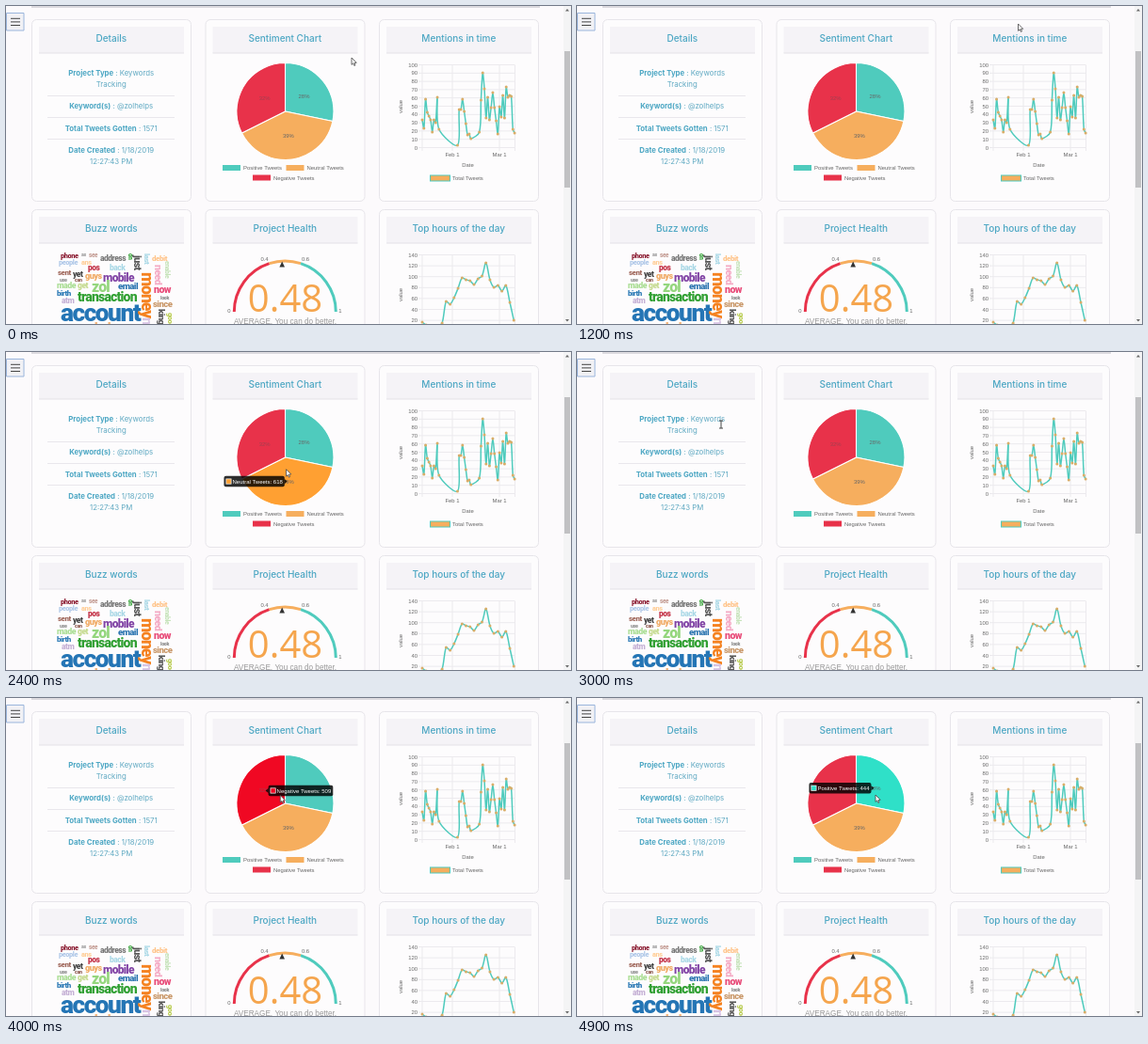
An HTML page with a canvas that plays this animation: 600x338 px, repeating every 5000 ms.

```html
<!DOCTYPE html>
<html lang="en">
<head>
<meta charset="utf-8">
<title>Dashboard</title>
<style>
html, body { margin: 0; width: 100%; height: 100%; overflow: hidden; background: #fcfafc; }
canvas { display: block; }
</style>
</head>
<body>
<canvas id="stage" width="600" height="338"></canvas>
<script>
const c = document.getElementById('stage').getContext('2d');
const TEAL = '#4fcbbd', ORANGE = '#f6ae5e', RED = '#e8324a', TITLE = '#4ba6c3';
const SANS = '"Liberation Sans", Arial, sans-serif', UI = 'Inter, sans-serif';
const TAU = Math.PI * 2;
const clamp = v => Math.max(0, Math.min(1, v));

function text(s, x, y, font, color, align = 'left') {
  c.font = font;
  c.fillStyle = color;
  c.textAlign = align;
  c.fillText(s, x, y);
}
function turned(s, x, y, angle, ...style) {
  c.save();
  c.translate(x, y);
  c.rotate(angle);
  text(s, 0, 0, ...style);
  c.restore();
}
function rect(x, y, w, h, color) {
  c.fillStyle = color;
  c.fillRect(x, y, w, h);
}
function roundBox(x, y, w, h, r, fill, stroke) {
  c.beginPath();
  c.roundRect(x, y, w, h, r);
  c.fillStyle = fill;
  c.fill();
  if (stroke) { c.strokeStyle = stroke; c.lineWidth = 1; c.stroke(); }
}
function poly(points, fill, stroke, width = 1) {
  c.beginPath();
  points.forEach(p => c.lineTo(...p));
  c.closePath();
  c.fillStyle = fill;
  c.fill();
  if (stroke) { c.strokeStyle = stroke; c.lineWidth = width; c.stroke(); }
}
const small = (s, x, y, align, color = '#666') => text(s, x, y, '5.9px ' + SANS, color, align);

function card(x, y, title) {
  roundBox(x + .5, y + .5, 169, 193, 5, '#fdfcfd', '#e7e5ea');
  rect(x + 8, y + 8, 154, 28, '#f5f3f7');
  rect(x + 8, y + 35.5, 154, 1, '#e4e2e8');
  text(title, x + 84.8, y + 23.5, '500 10px ' + UI, TITLE, 'center');
}

function frame() {
  rect(0, 0, 600, 338, '#fcfafc');
  rect(27, 0, 540, 2, '#dcdadf');
  rect(592, 0, 8, 338, '#f4f4f5');
  rect(593, 48, 6, 145, '#c1c1c3');
  poly([[594, 5.5], [596, 3], [598, 5.5]], '#666');
  poly([[594, 333], [596, 335.5], [598, 333]], '#666');
  roundBox(.5, 7.5, 18.5, 18.5, 0, '#f1f1f5', '#9ab5dc');
  for (const y of [12.8, 16.4, 20]) rect(5, y, 10, 1, '#444');
  ['Details', 'Sentiment Chart', 'Mentions in time'].forEach((s, i) => card(27 + i * 184.5, 14, s));
  ['Buzz words', 'Project Health', 'Top hours of the day'].forEach((s, i) => card(27 + i * 184.5, 216, s));
}

function details() {
  const bold = '700 7.8px ' + UI, light = '400 7.8px ' + UI, pale = '#5fa9c2';
  const row = (label, value, y) => {
    c.font = bold;
    const a = c.measureText(label).width;
    c.font = light;
    const x = 111.7 - (a + c.measureText(value).width) / 2;
    text(label, x, y, bold, TITLE);
    text(value, x + a, y, light, pale);
  };
  row('Project Type', ' : Keywords', 74.3);
  row('', 'Tracking', 85.8);
  row('Keyword(s)', ' : @zolhelps', 109.3);
  row('Total Tweets Gotten', ' : 1571', 132.5);
  row('Date Created', ' : 1/18/2019', 156.3);
  row('', '12:27:43 PM', 167.5);
  for (const y of [95, 118, 141]) rect(44, y, 135, 1, '#e9e7ec');
}

const PIE = { x: 296.5, y: 112, r: 51.5 };
let sum = 0;
const slices = [
  ['Positive Tweets', 444, TEAL, '#2fe0c8', '28%'],
  ['Neutral Tweets', 618, ORANGE, '#ffa032', '39%'],
  ['Negative Tweets', 509, RED, '#f00823', '32%']
].map(([name, n, color, hot, share]) => {
  const from = sum / 1571 * TAU, to = (sum += n) / 1571 * TAU, mid = (from + to) / 2;
  return { name, n, color, hot, share, from, to,
    x: PIE.x + Math.sin(mid) * PIE.r / 2, y: PIE.y - Math.cos(mid) * PIE.r / 2 };
});

function sliceAt(x, y) {
  const dx = x - PIE.x, dy = y - PIE.y;
  if (Math.hypot(dx, dy) > PIE.r) return;
  const a = (Math.atan2(dx, -dy) + TAU) % TAU;
  return slices.find(s => a < s.to);
}

function pie(hovered) {
  for (const s of slices) {
    c.beginPath();
    c.moveTo(PIE.x, PIE.y);
    c.arc(PIE.x, PIE.y, PIE.r, s.from - TAU / 4, s.to - TAU / 4);
    c.closePath();
    c.fillStyle = s === hovered ? s.hot : s.color;
    c.fill();
    c.strokeStyle = '#fff';
    c.lineWidth = 1.1;
    c.stroke();
  }
  for (const s of slices) small(s.share, s.x, s.y + 2, 'center', s.color === RED ? '#a33f50' : '#666');
  [[230, 169], [297.5, 169], [262, 179.5]].forEach(([x, y], i) => {
    rect(x, y, 19, 6, slices[i].color);
    small(slices[i].name, x + 22, y + 5);
  });
}

function tooltip(s, t) {
  const label = s.name + ': ' + s.n;
  c.font = '6px ' + SANS;
  const w = c.measureText(label).width + 11;
  const k = t > 3000 ? clamp((3700 - t) / 400) : 0;
  const x = s.x - 5 * k, y = s.y + 5 * k;
  const right = s.x < PIE.x, d = right ? 1 : -1;
  const left = right ? x + 4 : x - 4 - w;
  const dark = 'rgba(0,0,0,.82)';
  roundBox(left, y - 5.7, w, 11.4, 2, dark);
  poly([[x + d, y], [x + 4 * d, y - 2.5], [x + 4 * d, y + 2.5]], dark);
  rect(left + 2, y - 3, 6, 6, '#fff');
  rect(left + 2.7, y - 2.3, 4.6, 4.6, s.hot);
  text(label, left + 9, y + 2.1, '6px ' + SANS, '#fff');
}

// Smooth line whose handles are weighted by the distance to each neighbour
function curve(points) {
  const handles = points.map((p, i) => {
    const a = points[i - 1] || p, b = points[i + 1] || p;
    const da = Math.hypot(p[0] - a[0], p[1] - a[1]), db = Math.hypot(b[0] - p[0], b[1] - p[1]);
    const at = k => [p[0] + k * (b[0] - a[0]), p[1] + k * (b[1] - a[1])];
    return [at(-.3 * da / (da + db)), at(.3 * db / (da + db))];
  });
  c.beginPath();
  c.moveTo(...points[0]);
  for (let i = 1; i < points.length; i++) c.bezierCurveTo(...handles[i - 1][1], ...handles[i][0], ...points[i]);
  c.strokeStyle = TEAL;
  c.lineWidth = 1.5;
  c.lineJoin = 'round';
  c.stroke();
  for (const p of points) {
    c.beginPath();
    c.arc(...p, 1.5, 0, TAU);
    c.fillStyle = '#d9ad68';
    c.fill();
  }
}

function axis(top, step, max, by, bottom) {
  const grid = '#eceaee';
  for (let v = max, y = top; v >= 0 && y < 340; v -= by, y += step) {
    rect(438, y - .5, 102, 1, grid);
    small(v, 437, y + 2, 'right');
  }
  for (const x of [441.5, 473.5, 523.5, 540]) rect(x, top, 1, bottom - top, grid);
}

const mentions = [121, 130, 99, 113, 117, 121, 134, 121, 124, 97, 131, , , , , , , , , , ,
  148, 110, 110, 99, 112, 125, 137, 136, 141, , , , , 134, 100, 71, 88, 119, 97, 121, 108, 92, 108,
  122, 136, 107, 118, 95, 119, 86, 97, 95, 96, 131, 135];
const hours = [336, 339, 340, 341, 340, 337, 314, 317, 310, 300, 289, 291, 292, 296, 290, 287,
  273, 291, 299, 297, 303, 297, 315, 334];

function charts() {
  axis(62.5, 8.8, 100, 10, 154);
  const days = [];
  mentions.forEach((y, i) => days.push([442 + i * 1.784, y]));
  curve(days);
  small('Feb 1', 474, 160, 'center');
  small('Mar 1', 524, 160, 'center');
  small('Date', 490.5, 171, 'center');
  rect(450, 179.5, 22, 7, TEAL);
  rect(451, 180.5, 20, 5, ORANGE);
  small('Total Tweets', 474, 185);
  turned('value', 421, 107, -TAU / 4, '5.9px ' + SANS, '#666', 'center');

  axis(264.5, 11.6, 140, 20, 338);
  curve(hours.map((y, i) => [442 + i * 4.23, y]));
  turned('value', 421, 307, -TAU / 4, '5.9px ' + SANS, '#666', 'center');
}

function gauge() {
  [[0, .4, RED], [.4, .6, ORANGE], [.6, 1, TEAL]].forEach(([a, b, color]) => {
    c.beginPath();
    c.arc(296.3, 325, 54, Math.PI * (1 + a), Math.PI * (1 + b));
    c.strokeStyle = color;
    c.lineWidth = 3;
    c.stroke();
  });
  poly([[293.2, 271.5], [290.4, 277.5], [296, 277.5]], '#333');
  [['0', 237, 326], ['0.4', 274.5, 271], ['0.6', 318, 271], ['1', 355, 326]].forEach(([s, x, y]) =>
    small(s, x, y, 'center'));
  text('0.48', 296.5, 325, '40px "Open Sans", sans-serif', '#f5a54d', 'center');
  text('AVERAGE. You can do better.', 296.5, 337.5, '8.2px ' + SANS, '#999', 'center');
}

const across = [
  ['phone', 58, 267.5, 7, '#8c1d33'], ['as', 80, 266, 5, '#999'], ['see', 88, 267, 6, '#c49c94'],
  ['people', 56, 275, 7, '#aec7e8'], ['ans', 80, 275, 7, '#ffcf9a'], ['address', 100, 271, 8, '#777'],
  ['sent', 55, 286, 7.5, '#a0685c'], ['yet', 71, 288, 8, '#444'], ['pos', 87, 281, 8, '#c22d42'],
  ['back', 110, 281, 8, '#a9d8e6'], ['guys', 84, 290, 8.5, '#f0a860'], ['mobile', 103, 293, 11.3, '#8144a5'],
  ['use', 57, 293, 5, '#8c8c8c'], ['can', 73, 293, 5, '#8c564b'], ['made', 54, 300, 8.3, '#a8dd92'],
  ['get', 76, 300, 8, '#c3d98a'], ['zol', 91, 304, 15, '#94d67d'], ['email', 119, 301, 9, '#2a74b0'],
  ['birth', 54, 308, 7.5, '#2878b4'], ['atm', 59, 316, 8, '#c5b0d5'], ['transaction', 76, 314, 13.2, '#31a033'],
  ['account', 58, 335, 24.8, '#2475b5'], ['debit', 155, 270.5, 7.5, '#ffc48a'], ['now', 157, 305, 10, '#e84a78'],
  ['look', 164, 312, 5, '#888'], ['since', 156, 320, 9, '#c99768'], ['help', 94, 347, 13, '#f3b478']
];
const down = [
  ['just', 135.5, 265, 10, '#555'], ['on', 130, 263, 6, '#31a033'], ['last', 147, 263, 7.5, '#a9d8e6'],
  ['money', 144, 283, 16.5, '#f58220'], ['need', 158, 275, 10, '#f4a9c4'], ['enable', 169, 271, 6.5, '#c6e3ba'],
  ['make', 145, 331, 14, '#d8c4e4'], ['king', 162, 322, 9, '#555'], ['good', 172, 326, 7, '#b9cc52']
];

// Tight, tall, heavy lettering
function word([s, x, y, size, color], angle) {
  c.letterSpacing = -size * .06 + 'px';
  turned(s, x, y, angle, `900 ${size * 1.06}px Roboto, sans-serif`, color);
}

function cloud() {
  across.forEach(w => word(w, 0));
  down.forEach(w => word(w, TAU / 4));
  c.letterSpacing = '0px';
}

const path = [[0, 367, 55], [1200, 468.5, 19], [1900, 407.5, 161], [3000, 153, 77],
  [3500, 293.5, 102], [4500, 289, 105], [4900, 317, 103]];

function pointer(t) {
  const i = Math.max(1, path.findIndex(p => p[0] >= t));
  const [t0, x0, y0] = path[i - 1], [t1, x1, y1] = path[i];
  const u = clamp((t - t0) / (t1 - t0)), k = u * u * (3 - 2 * u);
  return [x0 + (x1 - x0) * k, y0 + (y1 - y0) * k];
}

function cursor(x, y) {
  if (x > 62 && x < 162 && y > 64 && y < 172) {
    rect(x - .5, y - 4, 1, 8, '#444');
    rect(x - 2, y - 4.5, 4, 1, '#444');
    rect(x - 2, y + 3.5, 4, 1, '#444');
    return;
  }
  const shape = [[0, 0], [0, 7.4], [1.7, 5.9], [2.8, 8.4], [4, 7.9], [2.9, 5.5], [5.2, 5.3]];
  poly(shape.map(([dx, dy]) => [x + dx, y + dy]), '#fff', '#444', .8);
}

function draw() {
  const t = Math.floor(performance.now() % 5000 / 100) * 100;
  const [x, y] = pointer(t), hovered = sliceAt(x, y);
  frame();
  details();
  pie(hovered);
  charts();
  cloud();
  gauge();
  if (hovered) tooltip(hovered, t);
  cursor(x, y);
  requestAnimationFrame(draw);
}
draw();
</script>
</body>
</html>
```
